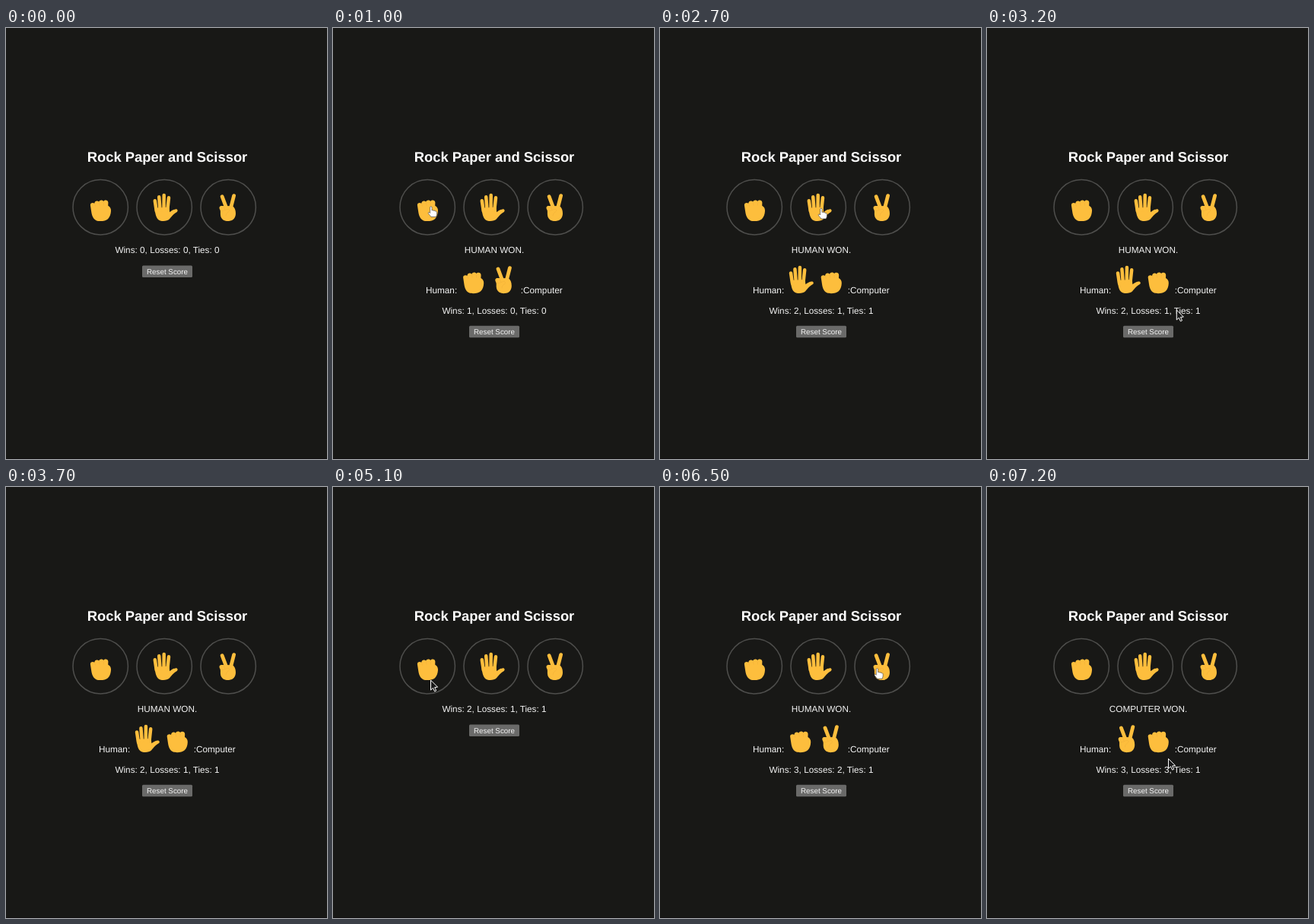
An HTML page that plays this animation: 422 by 567 pixels, repeating every 7.3 s.

```html
<!DOCTYPE html>
<html lang="en">
<head>
<meta charset="utf-8">
<title>Rock Paper and Scissor</title>
<style>
  html, body { margin: 0; width: 100%; height: 100%; overflow: hidden; background: #181816; }
  svg { display: block; width: 422px; height: 567px; }
  text { font: 11.76px "Liberation Sans", Arial, sans-serif; fill: #f4f4f4; text-rendering: geometricPrecision; }
  .mid { text-anchor: middle; }
  .title { font-size: 18.4px; font-weight: bold; fill: #fff; }
  .small { font-size: 9.8px; }
  .ring { fill: none; stroke: #4e4e4c; stroke-width: 1.5; }
  .skin { fill: #fdbe3d; stroke: #fdbe3d; stroke-linecap: round; stroke-linejoin: round; stroke-width: 0; }
  .crease { fill: none; stroke: #eeae38; stroke-width: .5; }
</style>
</head>
<body>
<svg viewBox="0 0 422 567">
  <defs>
    <g id="rock" class="skin">
      <path d="M-13.3-2.6C-13.6-5.2-10.4-6.6-8-5C-7.6-8.4-4.2-9.4-2-7.2C-1-9.8 2.6-10 4-7.8C6-10.2 10-9.4 10.2-6L10-2C12.8-.6 14 2 13.8 5C13.6 9 12.4 13 9.8 15.4C6.6 18.4-1.4 19-5.6 17.4C-9.6 15.6-11.4 10.8-12 6Z"/>
      <path class="crease" d="M-7.8-4.6L-6.6-1.4M-1.9-6.8L-1.2-2.6M4-7.2L4.2-2.6"/>
    </g>
    <g id="paper" class="skin">
      <path d="M-12.6 1C-12.4 6-11.6 12-8.6 15.6C-5 19.4 3.4 18.8 6.8 15.4C9 13 11 9.8 16.6 6.2C18.4 4.6 17 2.2 14.6 2.6C11.4 3 9.2 4.6 7 6.4L6.2 0Z"/>
      <path fill="none" style="stroke-width:4.5" d="M-12.4-8.5L-10.4 5M-7-13.6L-5.6 4M-.5-15.8L-.7 4M5.8-12.6L3.9 5"/>
    </g>
    <g id="scissors" class="skin">
      <path d="M-8.6-1.8C-11.6-2-12.4.6-11 3C-9.6 5.4-10.8 8-10 11.6C-8.6 17 -3.6 18.6 .8 18.2C7 17.8 9.8 13.4 9.8 8C9.8 3.4 8.4 0 5.4-1.6Z"/>
      <path fill="none" style="stroke-width:4.8" d="M-8-14L-2.4 1M7.4-15.2L3 2"/>
      <path class="crease" d="M-6-1L-4.4 3.4M-9.8 4.4C-6 6-4 3-1 2.6C2 2.2 2.2 5 .2 6.2C-2 7.4-3 9-3 11"/>
    </g>
    <path id="arrow" d="M.5.6V13.6L3.5 10.9L5.6 15.4L7.7 14.4L5.7 10.1L9.6 9.7Z"
      fill="#1a1a1a" stroke="#fff" stroke-width="1" stroke-linejoin="round"/>
    <path id="hand" d="M-1.4 9V1.4C-1.4 0 1 0 1 1.4V5.6C1.8 4.8 3 5 3.2 6C4 5.3 5.2 5.6 5.4 6.6C6.4 6.1 7.5 6.8 7.5 8V10.4C7.5 12 6.6 12.6 6.4 14H-.2C-.8 12.4-2.6 11.2-3.6 9.4C-4.2 8-2.8 7.2-1.4 9Z"
      fill="#fff" stroke="#333" stroke-width=".6" stroke-linejoin="round"/>
  </defs>

  <rect width="422" height="567" fill="#181816"/>
  <rect y="566" width="422" height="1" fill="#100d10"/>
  <text class="mid title" x="212" y="176.4">Rock Paper and Scissor</text>
  <g id="buttons"></g>

  <g id="result">
    <text id="verdict" class="mid" x="212" y="296.4"></text>
    <text x="122" y="349.4">Human:</text>
    <use id="human" x="184.4" y="330.9"/>
    <use id="computer" x="225" y="330.9"/>
    <text x="246.8" y="349.4">:Computer</text>
  </g>
  <g id="footer">
    <text id="score" class="mid" x="212" y="296.4"></text>
    <rect x="179" y="312.4" width="66" height="15.6" rx="1.5" fill="#6a6a69"/>
    <text class="mid small" x="212" y="323.8">Reset Score</text>
  </g>
  <use id="cursor"/>
</svg>

<script>
const LOOP = 7300, STEP = 100;
const HANDS = ["rock", "paper", "scissors"];
const VERDICTS = ["TIE.", "HUMAN WON.", "COMPUTER WON."];
const RELOAD = 4600;
const $ = id => document.getElementById(id);
const buttonX = i => 124.2 + 84 * i;
const BUTTON_Y = 235.8;

$("buttons").innerHTML = HANDS.map((hand, i) => `
  <circle class="ring" cx="${buttonX(i)}" cy="${BUTTON_Y}" r="36.2"/>
  <use href="#${hand}" x="${buttonX(i)}" y="${BUTTON_Y}"/>`).join("");

const rounds = [
  { at: 1000, human: "rock", computer: "scissors" },
  { at: 1600, human: "paper", computer: "scissors" },
  { at: 2200, human: "scissors", computer: "scissors" },
  { at: 2700, human: "paper", computer: "rock" },
  { at: 5700, human: "paper", computer: "scissors" },
  { at: 6200, human: "rock", computer: "scissors" },
  { at: 6800, human: "scissors", computer: "rock" }
];

// Each trip continues from the last one; bend is an optional curve handle
const trips = [
  { from: 0, until: 200, to: [397, 233] },
  { from: 200, until: 800, to: [129, 234.5] },
  { from: 1100, until: 1300, to: [212, 236] },
  { from: 1600, until: 2000, to: [287, 230] },
  { from: 2200, until: 2500, to: [212, 237] },
  { from: 2700, until: 3400, to: [245, 397], bend: [261, 333] },
  { from: 3400, until: 3700, to: [70, 166] },
  { from: 4600, until: 4700, to: [87, 163] },
  { from: 4700, until: 5100, to: [128, 253.5] },
  { from: 5100, until: 5500, to: [212.5, 242.5], bend: [165, 290] },
  { from: 5700, until: 6000, to: [138, 240] },
  { from: 6200, until: 6600, to: [313, 238] },
  { from: 6800, until: 7200, to: [238, 356.8] }
];

const outside = t => t < 200 || (t >= 3700 && t < 4700);
const ease = u => u * u * (3 - 2 * u);
const mix = (a, b, p) => a.map((v, i) => v + (b[i] - v) * p);
const overIcon = (x, y) => y > 217 && y < 253 &&
  HANDS.some((_, i) => Math.abs(x - buttonX(i)) < 15);

// 0 tie, 1 human wins, 2 computer wins
const judge = ({ human, computer }) =>
  (HANDS.indexOf(human) - HANDS.indexOf(computer) + 3) % 3;

function drawRound(t) {
  const played = rounds.filter(round => round.at <= t);
  const last = played[played.length - 1];
  const count = outcome => played.filter(round => judge(round) === outcome).length;
  const open = last && !(t >= RELOAD && last.at < RELOAD);
  $("score").textContent = `Wins: ${count(1)}, Losses: ${count(2)}, Ties: ${count(0)}`;
  $("footer").setAttribute("transform", `translate(0 ${open ? 79.3 : 0})`);
  $("result").style.display = open ? "" : "none";
  if (!open) return;
  $("verdict").textContent = VERDICTS[judge(last)];
  $("human").setAttribute("href", "#" + last.human);
  $("computer").setAttribute("href", "#" + last.computer);
}

function cursorAt(t) {
  const i = trips.findLastIndex(trip => trip.from <= t);
  const { from, until, to, bend } = trips[i];
  const start = i ? trips[i - 1].to : to;
  const p = ease(Math.min(1, (t - from) / (until - from)));
  return bend ? mix(mix(start, bend, p), mix(bend, to, p), p) : mix(start, to, p);
}

function drawCursor(t) {
  const [x, y] = cursorAt(t);
  $("cursor").style.display = outside(t) ? "none" : "";
  $("cursor").setAttribute("href", overIcon(x, y) ? "#hand" : "#arrow");
  $("cursor").setAttribute("transform", `translate(${x} ${y})`);
}

const origin = performance.now();
let shown = -1;
function tick() {
  const t = Math.floor((performance.now() - origin) % LOOP / STEP) * STEP;
  if (t !== shown) {
    drawRound(t);
    drawCursor(t);
    shown = t;
  }
  requestAnimationFrame(tick);
}
tick();
</script>
</body>
</html>
```
